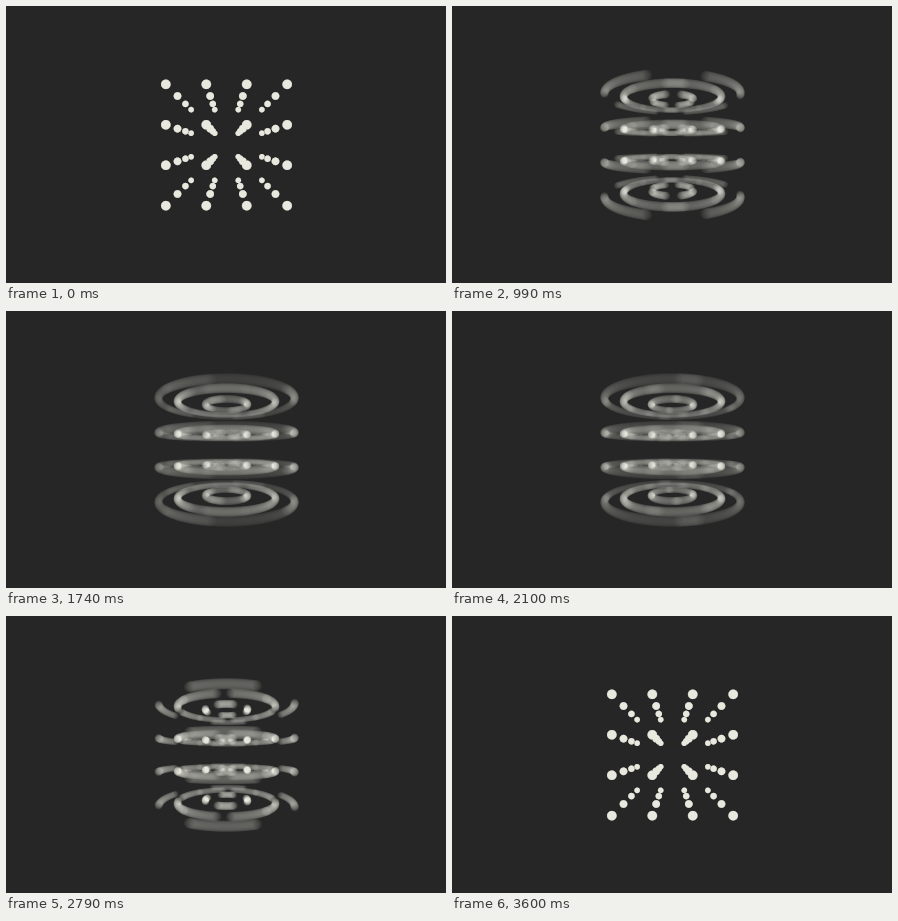
Write an HTML page with a canvas that moves like this. It is 440 by 277 pixels and loops after 3630 ms.

```html
<!DOCTYPE html>
<html lang="en">
<head>
<meta charset="utf-8">
<title>Spinning lattice</title>
<style>
  html, body { margin: 0; width: 100%; height: 100%; overflow: hidden; background: #262626; }
  canvas { display: block; }
</style>
</head>
<body>
<canvas id="stage" width="440" height="277"></canvas>
<script>
const ctx = document.getElementById('stage').getContext('2d');

const STEP = 30, STEPS = 121, LAST = STEPS - 1, HALF = LAST / 2;
const SHUTTER = 0.92;
const BACK = [38, 38, 38], INK = [232, 232, 223];

// Camera: distance and focal length in lattice units and pixels
const DIST = 5.69, FOCAL = 169.5, DOT = 0.117;

// Working area around the lattice
const X0 = 144, Y0 = 58, W = 154, H = 162;
const CX = 220.5 - X0, CY = 139 - Y0;

const HALF_TURN = 3555, DRIFT = 0.5, POWER = 2.5;
const GAIN = (HALF_TURN - DRIFT * HALF) / HALF ** POWER;

const sum = new Float32Array(W * H);
const cover = new Float32Array(W * H);
const image = ctx.createImageData(W, H);

const levels = [-1.5, -0.5, 0.5, 1.5];
const columns = levels.flatMap(x => levels.map(z => [x, z]));

// Degrees turned after k steps: speeds up to the middle, then mirrors
function angle(k) {
  if (k > HALF) return 2 * HALF_TURN - angle(LAST - k);
  return DRIFT * k + Math.sign(k) * GAIN * Math.abs(k) ** POWER;
}

function disc(x, y, r) {
  const left = Math.floor(x - r - 1), right = Math.ceil(x + r + 1);
  const top = Math.floor(y - r - 1), bottom = Math.ceil(y + r + 1);
  for (let j = top; j <= bottom; j++) {
    for (let i = left; i <= right; i++) {
      const c = r + 0.5 - Math.hypot(i + 0.5 - x, j + 0.5 - y);
      const at = j * W + i;
      if (c > cover[at]) cover[at] = Math.min(1, c);
    }
  }
}

function lattice(deg) {
  const a = deg * Math.PI / 180, cos = Math.cos(a), sin = Math.sin(a);
  for (const [x, z] of columns) {
    const scale = FOCAL / (DIST - (z * cos + x * sin));
    const px = CX + (x * cos - z * sin) * scale;
    for (const y of levels) disc(px, CY + y * scale, DOT * scale);
  }
}

function draw(k) {
  const from = k - SHUTTER / 2;
  const sweep = Math.abs(angle(k + SHUTTER / 2) - angle(from));
  const samples = Math.round(Math.min(100, 16 + sweep * 0.8));
  sum.fill(0);
  for (let s = 0; s < samples; s++) {
    cover.fill(0);
    lattice(angle(from + SHUTTER * (s + 0.5) / samples));
    for (let i = 0; i < sum.length; i++) sum[i] += cover[i];
  }
  // Mix light by squared values
  for (let i = 0; i < sum.length; i++) {
    const m = sum[i] / samples;
    for (let c = 0; c < 3; c++) {
      image.data[i * 4 + c] = Math.sqrt(BACK[c] ** 2 * (1 - m) + INK[c] ** 2 * m);
    }
    image.data[i * 4 + 3] = 255;
  }
  ctx.putImageData(image, X0, Y0);
}

ctx.fillStyle = `rgb(${BACK})`;
ctx.fillRect(0, 0, 440, 277);

let shown = 0;
draw(0);
const start = performance.now();

function tick() {
  const k = Math.floor((performance.now() - start) / STEP) % STEPS;
  if (k !== shown) draw(shown = k);
  requestAnimationFrame(tick);
}
requestAnimationFrame(tick);
</script>
</body>
</html>
```
